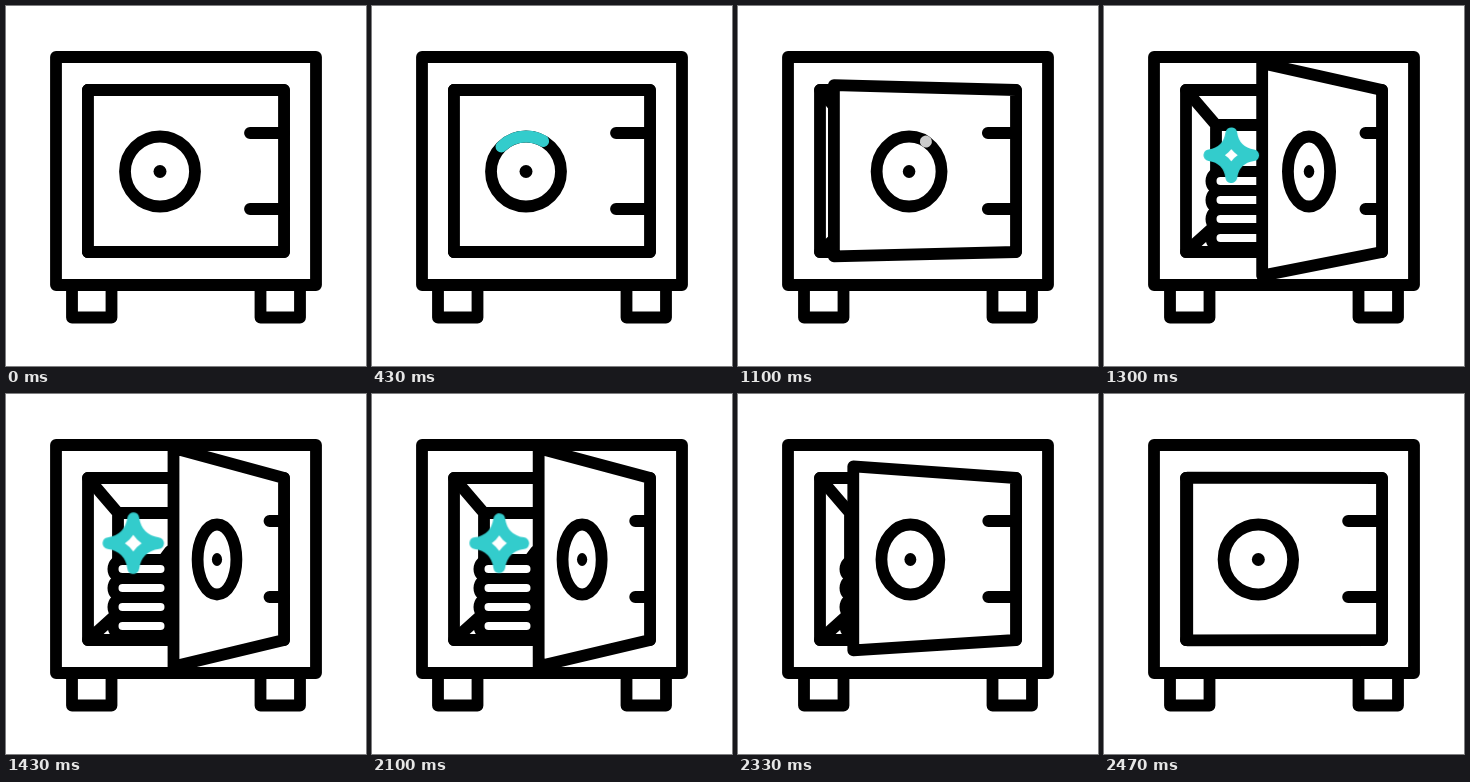
Write an HTML page without scripts that moves like this. It is 360 px wide and 360 px high and loops after 2500 ms.

```html
<!DOCTYPE html>
<html lang="en">
<head>
<meta charset="utf-8">
<title>Safe</title>
<style>
  @property --door { syntax: "<number>"; inherits: true; initial-value: 0; }
  @property --dial { syntax: "<number>"; inherits: true; initial-value: 0; }
  @property --head { syntax: "<number>"; inherits: true; initial-value: 0; }
  @property --tail { syntax: "<number>"; inherits: true; initial-value: 0; }

  html, body { margin: 0; width: 100%; height: 100%; overflow: hidden; background: #fff; }
  svg {
    display: block; width: 100vw; height: 100vh;
    fill: none; stroke: #000; stroke-width: 11.8;
    stroke-linecap: round; stroke-linejoin: round;
    animation: door 2.5s infinite, dial 2.5s infinite, head 2.5s infinite, tail 2.5s infinite;
  }

  .panel { fill: #fff; d: path("M82 84L278 84L278 246L82 246Z"); animation: panel 2.5s infinite; }
  .hinges { d: path("M244 127L278 127M244 203L278 203"); animation: hinges 2.5s infinite; }

  .ring, .hub { cx: calc(154px + 57px * var(--dial)); cy: 165.5px; }
  .ring { rx: calc(35px - 15.6px * var(--door)); ry: 35px; }
  .hub { rx: calc(6.5px - 1.4px * var(--door)); ry: 6.5px; fill: #000; stroke: none; }

  /* the highlight runs anticlockwise from one o'clock */
  .glow {
    --len: calc(360px * (var(--head) - var(--tail)));
    stroke: #3cc;
    stroke-dasharray: var(--len) calc(360px - var(--len));
    stroke-dashoffset: calc(360px * var(--head) - 300px);
    animation: glow 2.5s step-end infinite;
  }
  .star { fill: #fff; stroke: #3cc; vector-effect: non-scaling-stroke; animation: star 2.5s infinite; }

  @keyframes door {
    0%, 38.6% { --door: 0; animation-timing-function: cubic-bezier(.5,0,.5,1); }
    56.6%, 82.8% { --door: 1; animation-timing-function: cubic-bezier(.42,0,.68,1); }
    100% { --door: 0; }
  }
  @keyframes panel {
    0%, 38.6% {
      d: path("M82 84L278 84L278 246L82 246Z");
      animation-timing-function: cubic-bezier(.5,0,.5,1);
    }
    56.6%, 82.8% {
      d: path("M167.5 54L278 84L278 246L167.5 272.5Z");
      animation-timing-function: cubic-bezier(.42,0,.68,1);
    }
    100% { d: path("M82 84L278 84L278 246L82 246Z"); }
  }
  @keyframes dial {
    0%, 36.6% { --dial: 0; animation-timing-function: cubic-bezier(.4,0,.6,1); }
    56.4%, 82.8% { --dial: 1; animation-timing-function: cubic-bezier(.33,0,.67,1); }
    99.6%, 100% { --dial: 0; }
  }
  @keyframes hinges {
    0%, 36.6% {
      d: path("M244 127L278 127M244 203L278 203");
      animation-timing-function: cubic-bezier(.4,0,.6,1);
    }
    56.4%, 82.8% {
      d: path("M263.5 127L278 127M263.5 203L278 203");
      animation-timing-function: cubic-bezier(.33,0,.67,1);
    }
    99.6%, 100% { d: path("M244 127L278 127M244 203L278 203"); }
  }
  @keyframes head {
    0%, 9% { --head: 0; animation-timing-function: cubic-bezier(.33,0,.67,1); }
    37.2%, 100% { --head: 1; }
  }
  @keyframes tail {
    0%, 16.6% { --tail: 0; animation-timing-function: cubic-bezier(.33,0,.67,1); }
    44.6%, 100% { --tail: 1; }
  }
  @keyframes glow {
    0% { opacity: 0; stroke: #3cc; }
    9% { opacity: 1; stroke: #3cc; }
    43.4% { opacity: 1; stroke: #ccc; }
    45%, 100% { opacity: 0; stroke: #ccc; }
  }
  @keyframes star {
    0%, 44.8% { transform: scale(0); animation-timing-function: cubic-bezier(.33,0,.67,1); }
    54%, 83% { transform: scale(1); animation-timing-function: cubic-bezier(.33,0,.67,1); }
    92.4%, 100% { transform: scale(0); }
  }
</style>
</head>
<body>
<svg viewBox="0 0 360 360">
  <path d="M66 279V311.5H105.5V279M254.5 279V311.5H294V279"/>
  <rect x="50" y="51" width="260" height="228" fill="#fff"/>

  <!-- inside of the safe -->
  <path d="M82 84L112 119H250M112 119V219L82 246M158 165L164 157"/>
  <g fill="#fff" stroke-width="11">
    <rect id="bar" x="107" y="165.5" width="57" height="19" rx="9.5"/>
    <use href="#bar" y="19"/>
    <use href="#bar" y="38"/>
    <use href="#bar" y="57"/>
  </g>
  <rect x="82" y="84" width="196" height="162"/>

  <path class="panel"/>
  <path class="hinges"/>
  <ellipse class="ring"/>
  <ellipse class="ring glow" pathLength="360"/>
  <ellipse class="hub"/>

  <g transform="translate(127.3 149.2)">
    <path class="star" d="M0-24.8C2-11 11-2 24.8 0C11 2 2 11 0 24.8C-2 11-11 2-24.8 0C-11-2-2-11 0-24.8Z"/>
  </g>
</svg>
</body>
</html>
```
